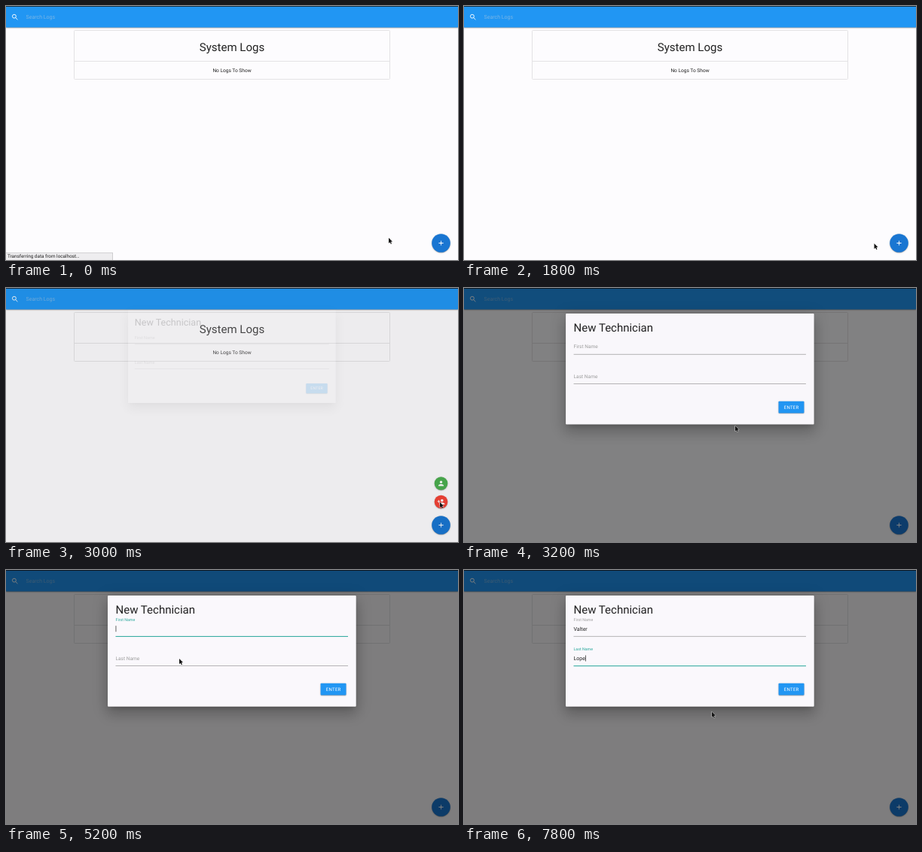
An HTML page with a canvas for the animation above (8000 ms loop, 600 px wide and 338 px high).

```html
<!DOCTYPE html>
<html lang="en">
<head>
<meta charset="utf-8">
<title>System Logs</title>
<style>
  html, body { margin: 0; width: 100%; height: 100%; overflow: hidden; background: #fdfcfe; }
  canvas { display: block; width: 100vw; height: 100vh; }
</style>
</head>
<body>
<canvas id="stage"></canvas>
<script>
const W = 600, H = 338, LOOP = 8000, TICK = 200;
const UNIT = W / 1366; // page pixels to stage pixels
const FONT = 'Roboto, sans-serif';
const BLUE = '#2196f3', TEAL = '#26a69a', GREY = '#9e9e9e', INK = 'rgba(0,0,0,.87)';
const dpr = window.devicePixelRatio || 1;

function makeContext(canvas) {
  canvas.width = Math.round(W * dpr);
  canvas.height = Math.round(H * dpr);
  return canvas.getContext('2d');
}
const stage = makeContext(document.getElementById('stage'));
const layer = makeContext(document.createElement('canvas'));

// Elevations: [offset y, blur, spread, alpha] in page pixels
const LOW = [[2, 2, 0, .14], [3, 1, -2, .12], [1, 5, 0, .2]];
const HIGH = [[24, 38, 3, .14], [9, 46, 8, .12], [11, 15, -7, .2]];

const PERSON = new Path2D('M12 4a4 4 0 1 1 0 8a4 4 0 1 1 0-8zM12 14c-2.67 0-8 1.34-8 4v2h16v-2c0-2.66-5.33-4-8-4z');
const PERSON_ADD = new Path2D('M15 4a4 4 0 1 1 0 8a4 4 0 1 1 0-8zM15 14c-2.67 0-8 1.34-8 4v2h16v-2c0-2.66-5.33-4-8-4zM6 10V7H4v3H1v2h3v3h2v-3h3v-2z');
const PLUS = new Path2D('M19 13h-6v6h-2v-6H5v-2h6V5h2v6h6v2z');
const ARROW = new Path2D('M0 0V7.2L1.7 5.7L2.8 8.3L4 7.8L2.9 5.3L5 5.1Z');

const clamp = v => Math.max(0, Math.min(1, v));
const lerp = (a, b, p) => a + (b - a) * p;
const outPow = (p, n) => 1 - Math.pow(1 - p, n);
const outCirc = p => Math.sqrt(1 - (p - 1) ** 2);

function fillBox(c, x, y, w, h, r) {
  c.beginPath();
  c.roundRect(x, y, w, h, r);
  c.fill();
}

function box(c, x, y, w, h, r, color, shadows = [], zoom = 1) {
  const far = 2000, k = dpr * zoom;
  for (const [dy, blur, spread, alpha] of shadows) {
    const s = spread * UNIT;
    c.save();
    c.shadowColor = `rgba(0,0,0,${alpha})`;
    c.shadowBlur = blur * UNIT * k;
    c.shadowOffsetX = far * k;
    c.shadowOffsetY = dy * UNIT * k;
    c.fillStyle = '#000';
    fillBox(c, x - s - far, y - s, w + 2 * s, h + 2 * s, Math.max(0, r + s));
    c.restore();
  }
  c.fillStyle = color;
  fillBox(c, x, y, w, h, r);
}

function text(c, str, x, y, size, color, align = 'left', spacing = 0) {
  c.font = `${size}px ${FONT}`;
  c.textRendering = 'geometricPrecision';
  c.letterSpacing = spacing + 'px';
  c.textAlign = align;
  c.fillStyle = color;
  c.fillText(str, x, y);
}

function icon(c, path, x, y) {
  c.save();
  c.translate(x, y);
  c.scale(UNIT, UNIT);
  c.translate(-12, -12);
  c.fillStyle = '#fff';
  c.fill(path);
  c.restore();
}

function roundButton(c, x, y, r, color, path) {
  box(c, x - r, y - r, 2 * r, 2 * r, r, color, LOW);
  icon(c, path, x, y);
}

function drawPage(c, t) {
  c.fillStyle = '#fdfcfe';
  c.fillRect(0, 0, W, H);

  box(c, 0, 0, W, 28.5, 0, BLUE, LOW);
  c.fillStyle = '#1b2f40';
  c.fillRect(0, 0, W, 1);
  c.strokeStyle = '#fff';
  c.lineWidth = .95;
  c.beginPath();
  c.arc(10.9, 13.7, 2.45, 0, 7);
  c.moveTo(12.7, 15.5);
  c.lineTo(15.4, 18.2);
  c.stroke();
  text(c, 'Search Logs', 26.5, 17.3, 7.03, '#78b5e6');

  c.strokeStyle = '#e4e3e5';
  c.lineWidth = 1;
  c.beginPath();
  c.roundRect(90.5, 32.5, 419, 65, 1);
  c.moveTo(90.5, 73.5);
  c.lineTo(509.5, 73.5);
  c.stroke();
  text(c, 'System Logs', 300, 60.3, 15, INK, 'center');
  text(c, 'No Logs To Show', 300, 88.1, 6.59, INK, 'center');

  if (t < 1400) {
    box(c, -2, 328, 144, 12, 1, '#b9b8ba');
    box(c, -2, 328.6, 143.4, 12, 1, '#eeedef');
    text(c, 'Transferring data from localhost…', 2, 335.4, 6.36, '#222');
  }

  if (t < 3100) {
    drawMenuItem(c, t - 2150, 284.5, '#f44336', PERSON_ADD);
    drawMenuItem(c, t - 2190, 260, '#4caf50', PERSON);
  }
  roundButton(c, 577.5, 315.5, 12.3, '#1976d2', PLUS);
}

function drawMenuItem(c, age, y, color, path) {
  if (age <= 0) return;
  const p = outCirc(clamp(age / 275)), k = lerp(.4, 1, p);
  c.save();
  c.globalAlpha = p;
  c.translate(577.5, y + 40 * UNIT * (1 - p));
  c.scale(k, k);
  roundButton(c, 0, 0, 8.8, color, path);
  c.restore();
}

const MODAL_AT = 2984;
const FIELDS = [
  { label: 'First Name', value: 'Valter', y: 80.4, from: 4950, to: 7150,
    keys: [[6200, 1], [6400, 2], [6600, 4], [6800, 5], [7000, 6]] },
  { label: 'Last Name', value: 'Lope', y: 119.7, from: 7150, to: Infinity,
    keys: [[7400, 1], [7600, 2], [7800, 4]] }
];

function drawField(c, f, t) {
  const x = 145.5, active = t >= f.from && t < f.to;
  const p = outPow(clamp((t - f.from) / 200), 2);
  text(c, f.label, x, f.y - 12.5 * p, 6.59 * lerp(1, .8, p), active ? TEAL : GREY);
  c.fillStyle = active ? TEAL : GREY;
  c.fillRect(x, f.y + 7.5, 308.5, active ? 1 : .75);

  const count = f.keys.reduce((n, [at, k]) => t >= at ? k : n, 0);
  const typed = f.value.slice(0, count);
  text(c, typed, x, f.y + .1, 7.03, INK);
  const caretOn = t >= 6000 || (t - 5000) % 1000 < 500;
  if (active && caretOn) {
    const w = c.measureText(typed).width;
    c.fillStyle = '#222';
    c.fillRect(x + w + .1, f.y - 6.2, .7, 8);
  }
}

function drawModal(t) {
  const age = clamp((t - MODAL_AT) / 250);
  if (age <= 0) return;
  stage.fillStyle = `rgba(0,0,0,${.5 * outPow(age, 2)})`;
  stage.fillRect(0, 0, W, H);

  const p = outPow(age, 3), zoom = lerp(.8, 1, p);
  const mid = 107.9, c = layer;
  c.setTransform(1, 0, 0, 1, 0, 0);
  c.clearRect(0, 0, c.canvas.width, c.canvas.height);
  c.scale(dpr, dpr);
  c.translate(300, mid - .06 * H * (1 - p));
  c.scale(zoom, zoom);
  c.translate(-300, -mid);

  box(c, 135, 34.1, 329.7, 147.6, 1, '#faf8fc', HIGH, zoom);
  text(c, 'New Technician', 145.5, 58.1, 15, INK);
  FIELDS.forEach(f => drawField(c, f, t));
  box(c, 417.6, 150.7, 33.9, 15.8, .9, BLUE, LOW, zoom);
  text(c, 'ENTER', 434.7, 160.8, 6.15, '#fff', 'center', .22);

  stage.globalAlpha = p;
  stage.drawImage(layer.canvas, 0, 0, W, H);
  stage.globalAlpha = 1;
}

// Pointer stops: [time, x, y]
const PATH = [
  [0, 508, 308.5], [600, 512, 309.5], [1800, 544.5, 316], [2200, 574, 315],
  [2600, 577, 301], [3000, 576, 285], [3200, 360, 183.5], [3400, 300, 150],
  [3600, 276, 137], [4400, 280.5, 139.7], [4800, 173, 77.5], [5000, 173, 77.5],
  [5200, 230, 118], [5400, 322, 184], [5600, 329, 188.7], [LOOP, 329, 188.7]
];

function drawPointer(c, t) {
  const i = PATH.findIndex(s => s[0] > t);
  const [t0, x0, y0] = PATH[i - 1], [t1, x1, y1] = PATH[i];
  const p = (t - t0) / (t1 - t0);
  const x = lerp(x0, x1, p), y = lerp(y0, y1, p);
  c.save();
  c.translate(x, y);
  if (t > 4600 && y < 88) {
    c.fillStyle = '#222';
    c.fillRect(-.35, -3.5, .7, 7);
    c.fillRect(-1.5, -3.9, 3, .6);
    c.fillRect(-1.5, 3.3, 3, .6);
  } else {
    c.strokeStyle = 'rgba(255,255,255,.8)';
    c.lineWidth = .9;
    c.stroke(ARROW);
    c.fillStyle = '#151515';
    c.fill(ARROW);
  }
  c.restore();
}

const start = performance.now();
function frame() {
  const elapsed = (performance.now() - start) % LOOP;
  const t = Math.floor(elapsed / TICK) * TICK;
  stage.setTransform(dpr, 0, 0, dpr, 0, 0);
  drawPage(stage, t);
  drawModal(t);
  drawPointer(stage, t);
  requestAnimationFrame(frame);
}
frame();
</script>
</body>
</html>
```
